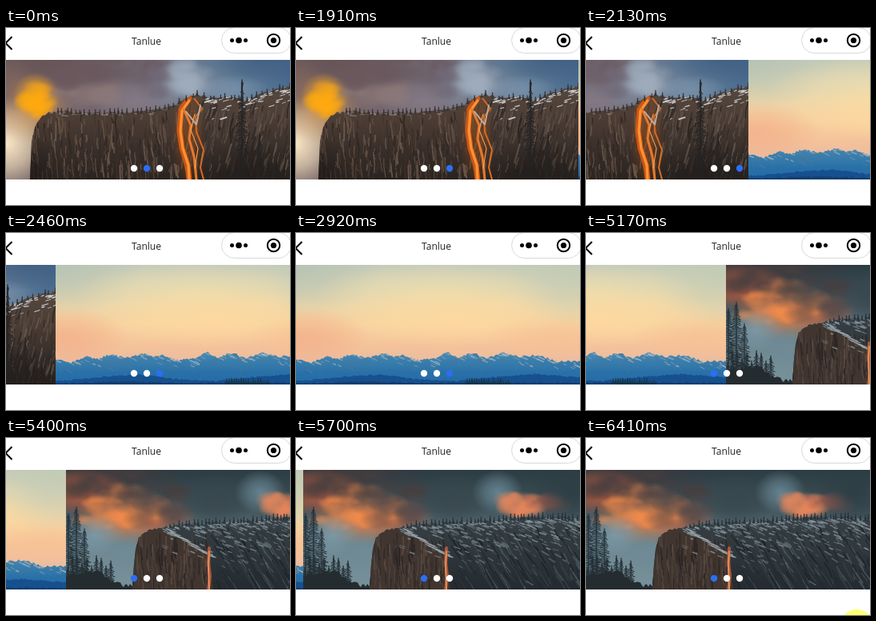
Animation of 355 by 222 pixels, one loop 6.48 s. Source, as an HTML page with a canvas:

```html
<!DOCTYPE html>
<html lang="en">
<head>
<meta charset="utf-8">
<title>Carousel</title>
<style>
html, body { margin: 0; width: 100%; height: 100%; overflow: hidden; background: #fff; }
canvas { position: absolute; left: 0; top: 0; display: block; }
h1 {
  position: absolute; left: 0; top: 7px; width: 351px; margin: 0; text-align: center;
  font: 400 12px/20px "Open Sans", "Noto Sans", sans-serif; color: #222;
}
</style>
</head>
<body>
<canvas id="stage" width="355" height="222"></canvas>
<h1>Tanlue</h1>
<script>
const W = 355, H = 222, TOP = 40, PH = 150, LOOP = 6480;
const ctx = document.getElementById('stage').getContext('2d');

function makeRandom(seed) {
  return () => {
    seed = (seed * 1664525 + 1013904223) >>> 0;
    return seed / 4294967296;
  };
}

function picture(seed, paint) {
  const c = document.createElement('canvas');
  c.width = W;
  c.height = PH;
  paint(c.getContext('2d'), makeRandom(seed));
  return c;
}

function fade(g, stops, x1 = 0, y1 = PH) {
  const f = g.createLinearGradient(0, 0, x1, y1);
  stops.forEach((s, i) => f.addColorStop(i / (stops.length - 1), s));
  return f;
}

function fillAll(g, style) {
  g.fillStyle = style;
  g.fillRect(0, 0, W, PH);
}

// Soft elliptical patch, rgb given as "r,g,b"
function glow(g, x, y, rx, ry, rgb, a = 1) {
  g.save();
  g.translate(x, y);
  g.scale(rx, ry);
  const f = g.createRadialGradient(0, 0, 0, 0, 0, 1);
  f.addColorStop(0, `rgba(${rgb},${a})`);
  f.addColorStop(0.5, `rgba(${rgb},${a * 0.6})`);
  f.addColorStop(1, `rgba(${rgb},0)`);
  g.fillStyle = f;
  g.fillRect(-1, -1, 2, 2);
  g.restore();
}

// Ragged cloud: many small glows inside an ellipse
function puffs(g, rnd, n, x, y, rx, ry, rgb, a, size) {
  for (let i = 0; i < n; i++) {
    const t = rnd() * 6.283, d = Math.sqrt(rnd());
    const s = size * (0.5 + rnd());
    glow(g, x + Math.cos(t) * d * rx, y + Math.sin(t) * d * ry, s * 1.5, s, rgb, a);
  }
}

// Height of a polyline [x, y, x, y, ...] at x
function heightAt(p, x) {
  let i = 0;
  while (i < p.length - 4 && x > p[i + 2]) i += 2;
  const k = (x - p[i]) / (p[i + 2] - p[i]);
  return p[i + 1] + (p[i + 3] - p[i + 1]) * k;
}

function ridge(g, rnd, p, rough) {
  const end = p[p.length - 2];
  g.beginPath();
  g.moveTo(p[0], PH);
  for (let x = p[0]; x <= end; x += 2) g.lineTo(x, heightAt(p, x) + (rnd() - 0.5) * rough);
  g.lineTo(end, heightAt(p, end));
  g.lineTo(end, PH);
  g.closePath();
}

function stroke(g, pts, color, width) {
  g.strokeStyle = color;
  g.lineWidth = width;
  g.lineCap = g.lineJoin = 'round';
  g.beginPath();
  for (let i = 0; i < pts.length; i += 2) g.lineTo(pts[i], pts[i + 1]);
  g.stroke();
}

function streaks(g, rnd, n, x0, x1, y0, y1, colors, lean) {
  for (let i = 0; i < n; i++) {
    const x = x0 + rnd() * (x1 - x0), y = y0 + rnd() * (y1 - y0), l = 5 + rnd() * 20;
    const c = colors[Math.floor(rnd() * colors.length)];
    stroke(g, [x, y, x + lean * l + rnd() * 2 - 1, y + l / 2, x + lean * 2 * l + rnd() * 4 - 2, y + l],
      c, 0.5 + rnd() * 1.5);
  }
}

// Short flecks below a ridge line
function flecks(g, rnd, n, p, x0, x1, depth, color, slope) {
  for (let i = 0; i < n; i++) {
    const x = x0 + rnd() * (x1 - x0), y = heightAt(p, x) + rnd() * rnd() * depth;
    const l = 2 + rnd() * 6;
    stroke(g, [x, y, x + l, y + l * slope + rnd() - 0.5], color, 0.5 + rnd() * 1.4);
  }
}

function tree(g, rnd, x, y, base, half, color) {
  stroke(g, [x, y, x, base], color, 1.3);
  for (let v = y + 3; v < base; v += 2.2) {
    const k = Math.min(1, (v - y) / (base - y) * 1.5 + 0.15);
    const a = half * k * (0.3 + rnd() * 0.7), b = half * k * (0.3 + rnd() * 0.7);
    stroke(g, [x - a, v + 1.5, x, v, x + b, v + 1.5], color, 1.1);
  }
}

const ember = picture(11, (g, rnd) => {
  fillAll(g, fade(g, ['#2c3c43', '#41535a', '#6e8791', '#78929c']));
  glow(g, 50, 0, 110, 32, '63,57,60', 0.9);
  glow(g, 15, 28, 70, 30, '190,91,60', 0.95);
  glow(g, 75, 58, 65, 38, '238,132,72', 0.95);
  glow(g, 120, 60, 45, 26, '180,94,67', 0.7);
  puffs(g, rnd, 34, 65, 48, 65, 24, '245,140,75', 0.5, 9);
  puffs(g, rnd, 24, 75, 20, 85, 15, '70,62,63', 0.55, 11);
  puffs(g, rnd, 16, 110, 45, 45, 22, '77,70,71', 0.5, 10);
  glow(g, 36, 82, 38, 26, '126,157,171', 0.85);
  glow(g, 75, 100, 26, 25, '112,140,152', 0.75);
  glow(g, 188, 38, 48, 35, '57,71,78', 0.85);
  glow(g, 243, 28, 32, 28, '111,144,158', 0.8);
  puffs(g, rnd, 20, 272, 43, 22, 13, '230,134,91', 0.6, 9);
  puffs(g, rnd, 12, 298, 42, 25, 8, '164,93,79', 0.5, 8);
  glow(g, 335, 28, 55, 45, '44,61,68', 0.85);

  const top = [83, 148, 86, 103, 91, 84, 104, 76, 125, 71, 150, 68, 190, 65, 230, 64, 252, 61, 300, 59, 355, 61];
  ridge(g, rnd, top, 2.5);
  g.save();
  g.clip();
  fillAll(g, fade(g, ['#394247', '#394247', '#30383d', '#242a2f']));
  g.fillStyle = '#40352f';
  g.beginPath();
  g.moveTo(80, PH);
  for (const [x, y] of [[84, 75], [115, 72], [137, 82], [163, 94], [178, 106], [184, PH]]) g.lineTo(x, y);
  g.fill();
  streaks(g, rnd, 150, 83, 180, 78, 140, ['#332b29', '#4c3f38', '#2a2525', '#574840'], 0.02);
  streaks(g, rnd, 190, 180, 355, 70, 140, ['#232b30', '#303a40', '#455158', '#1e2529'], 0.3);
  flecks(g, rnd, 240, top, 120, 355, 45, 'rgba(139,154,162,.7)', 0.35);
  flecks(g, rnd, 110, top, 185, 340, 85, 'rgba(122,138,147,.55)', 0.6);
  for (let i = 0; i < 45; i++) {
    const x = 125 + i * 1.3, y = 73 + i * 0.76 + rnd() * 4;
    stroke(g, [x, y, x + 5, y + 2], 'rgba(157,168,174,.75)', 1.3);
  }
  stroke(g, [179, 98, 178, 116, 180, 133, 178, PH], '#a95838', 4);
  stroke(g, [179, 102, 178, 119, 179, PH], '#ef9660', 1.6);
  g.restore();
  for (let x = 130; x < 355; x += 3 + rnd() * 4) {
    const y = heightAt(top, x);
    tree(g, rnd, x, y - 2 - rnd() * 4, y + 2, 1.5, '#29343a');
  }
  tree(g, rnd, 13, 47, PH, 12, '#253138');
  tree(g, rnd, 3, 55, PH, 12, '#263239');
  tree(g, rnd, 23, 74, PH, 9, '#29353b');
  for (let i = 0; i < 10; i++) tree(g, rnd, i * 6 + 2, 103 + rnd() * 20, PH, 7, '#263036');
  g.fillStyle = '#252c30';
  ridge(g, rnd, [0, 132, 25, 127, 43, 129, 63, 143, 83, 146], 6);
  g.fill();
});

const firefall = picture(23, (g, rnd) => {
  fillAll(g, fade(g, ['#716063', '#726268', '#75717d', '#6c8299', '#486b8f'], W, 0));
  glow(g, 55, 5, 110, 30, '100,81,82', 0.8);
  glow(g, 0, 105, 60, 60, '252,232,197', 1);
  glow(g, 35, 62, 50, 45, '215,158,92', 0.7);
  glow(g, 7, 32, 35, 34, '135,104,91', 0.7);
  glow(g, 38, 47, 30, 32, '244,162,22', 0.9);
  puffs(g, rnd, 25, 39, 50, 16, 24, '255,169,14', 0.55, 8);
  puffs(g, rnd, 15, 98, 43, 38, 15, '138,118,117', 0.5, 12);
  puffs(g, rnd, 25, 120, 16, 75, 22, '105,87,93', 0.5, 14);
  glow(g, 160, 52, 55, 25, '137,125,135', 0.7);
  puffs(g, rnd, 24, 224, 27, 28, 23, '158,172,188', 0.45, 13);
  puffs(g, rnd, 10, 188, 27, 10, 26, '112,105,120', 0.5, 11);
  glow(g, 318, 0, 90, 32, '61,91,126', 0.75);
  glow(g, 284, 38, 45, 20, '128,154,178', 0.6);

  const top = [30, 148, 31, 106, 36, 85, 43, 72, 53, 66, 75, 64, 100, 67, 130, 66, 160, 65, 188, 62,
    208, 58, 221, 50, 239, 43, 254, 48, 276, 46, 300, 50, 320, 42, 340, 36, 355, 33];
  ridge(g, rnd, top, 2.5);
  g.save();
  g.clip();
  fillAll(g, fade(g, ['#55473e', '#55473e', '#4b3c34', '#392f2a', '#29231f']));
  streaks(g, rnd, 330, 32, 225, 65, 140, ['#3a2e29', '#604e42', '#302722', '#685548', '#4c3c33'], 0.03);
  streaks(g, rnd, 230, 225, 355, 50, 140, ['#342d2a', '#554941', '#2a2523', '#65564b'], -0.12);
  glow(g, 34, 140, 35, 45, '32,26,24', 0.6);
  glow(g, 305, 142, 65, 40, '31,27,25', 0.65);
  flecks(g, rnd, 65, top, 248, 355, 29, 'rgba(216,221,226,.85)', -0.3);
  flecks(g, rnd, 42, top, 45, 215, 6, 'rgba(177,163,153,.5)', 0.05);
  glow(g, 228, 97, 22, 65, '169,82,25', 0.5);
  stroke(g, [229, 48, 219, 62, 217, 89, 220, 111, 227, 132, 229, PH], '#ce5715', 7);
  stroke(g, [229, 51, 220, 64, 218, 89, 221, 111, 228, 132, 229, PH], '#ff9230', 3.2);
  stroke(g, [222, 62, 231, 82, 229, 99, 235, 121, 238, PH], '#e6792a', 3);
  stroke(g, [235, 48, 245, 61, 237, 71, 238, 90, 247, 113, 243, 135, 247, PH], '#d96b23', 2);
  stroke(g, [236, 68, 231, 88, 240, 111, 236, 136], '#ffac58', 1);
  stroke(g, [225, 65, 238, 81, 243, 57], '#b5a9a1', 2);
  g.restore();
  for (let x = 65; x < 355; x += 4 + rnd() * 5) {
    const y = heightAt(top, x);
    tree(g, rnd, x, y - 2 - rnd() * 3, y + 2, 1.7, '#373434');
  }
  tree(g, rnd, 295, 25, PH, 8, '#242323');
  tree(g, rnd, 317, 91, PH, 6, '#282524');
  for (let i = 0; i < 9; i++) tree(g, rnd, 268 + i * 10, 122 + rnd() * 16, PH, 6, '#25211f');
  tree(g, rnd, 38, 130, PH, 6, '#211e1c');
});

const dusk = picture(37, (g, rnd) => {
  fillAll(g, fade(g, ['#c5ccb9', '#d7d2b4', '#ebd6aa', '#f7d3a1', '#f5c39a', '#e9bba0', '#d5b4a5']));
  glow(g, 0, 0, 110, 65, '177,192,178', 0.7);
  glow(g, 345, 8, 85, 70, '191,202,181', 0.65);
  glow(g, 175, 34, 155, 35, '238,222,174', 0.75);
  glow(g, 195, 64, 150, 39, '255,218,158', 0.8);
  glow(g, 12, 90, 80, 38, '242,173,137', 0.75);
  glow(g, 325, 91, 90, 28, '246,190,146', 0.6);

  const far = [0, 119, 19, 123, 38, 115, 52, 118, 70, 112, 86, 117, 110, 111, 122, 116, 135, 113, 153, 120,
    174, 117, 190, 110, 202, 116, 222, 110, 237, 117, 262, 110, 278, 116, 301, 113, 325, 121, 355, 121];
  ridge(g, rnd, far, 3);
  g.save();
  g.clip();
  fillAll(g, fade(g, ['#83a5b8', '#83a5b8', '#83a5b8', '#7da2b8', '#397fae', '#1b62a0']));
  flecks(g, rnd, 180, far, 0, W, 22, 'rgba(69,121,157,.65)', 0.65);
  flecks(g, rnd, 75, far, 0, W, 14, 'rgba(177,187,188,.65)', 0.45);
  g.restore();
  g.fillStyle = fade(g, ['#397dad', '#397dad', '#397dad', '#236ba6']);
  ridge(g, rnd, [0, 134, 60, 137, 120, 132, 190, 136, 255, 132, 310, 135, 355, 131], 3);
  g.fill();
  g.fillStyle = '#17508e';
  ridge(g, rnd, [0, 146, 35, 143, 70, 139, 110, 138, 145, 143, 200, 146, 255, 140, 300, 137, 355, 141], 2);
  g.fill();
  g.fillStyle = '#123f70';
  ridge(g, rnd, [0, 149, 80, 146, 165, 148, 260, 147, 355, 148], 2);
  g.fill();
  for (let x = 214; x < 267; x += 3) tree(g, rnd, x, 142 + rnd() * 4, PH, 3, '#17374c');
});

const moves = [
  { at: 1910, start: 1908, steps: [0, 70, 150, 220, 320, 390, 470, 540, 620, 700, 780, 850, 930, 1010] },
  { at: 4940, start: 4898, steps: [0, 70, 150, 230, 310, 380, 460, 530, 600, 680, 760, 840, 930] }
];
const slides = [firefall, dusk, ember];

// Carousel position in slides, updated only at the listed steps
function position(t) {
  return moves.reduce((sum, m) => {
    if (t < m.at) return sum;
    const now = m.at + m.steps.filter(s => s <= t - m.at).pop();
    const k = Math.min(1, (now - m.start) / 990);
    return sum + 1 - Math.pow(1 - k, 2.2);
  }, 0);
}

function disc(x, y, r, color) {
  ctx.fillStyle = color;
  ctx.beginPath();
  ctx.arc(x, y, r, 0, 7);
  ctx.fill();
}

function header() {
  ctx.lineCap = 'butt';
  ctx.lineJoin = 'miter';
  ctx.strokeStyle = '#000';
  ctx.lineWidth = 2;
  ctx.beginPath();
  ctx.moveTo(7.5, 11);
  ctx.lineTo(-0.5, 19);
  ctx.lineTo(7.5, 27);
  ctx.stroke();

  ctx.strokeStyle = '#d9d9d9';
  ctx.lineWidth = 1;
  ctx.beginPath();
  ctx.roundRect(269.5, -0.5, 87, 32, 16);
  ctx.stroke();
  disc(282.5, 15.5, 2.5, '#000');
  disc(291, 15.5, 3.8, '#000');
  disc(299.5, 15.5, 2.5, '#000');
  ctx.strokeStyle = '#000';
  ctx.lineWidth = 2;
  ctx.beginPath();
  ctx.arc(334.5, 15.5, 7.7, 0, 7);
  ctx.stroke();
  disc(334.5, 15.5, 3.6, '#000');
}

function draw(t) {
  ctx.fillStyle = '#fff';
  ctx.fillRect(0, 0, W, H);
  const x = Math.round(position(t) * W);
  slides.forEach((s, i) => ctx.drawImage(s, i * W - x, TOP));
  const active = t < 1910 ? 1 : t < 4940 ? 2 : 0;
  for (let i = 0; i < 3; i++) disc(160 + i * 16, 176, 4.2, i === active ? '#2b6ff3' : '#fff');
  header();
  if (t >= 6410) disc(338.5, 237, 22, '#ffff70');
}

const began = performance.now();
function tick() {
  draw((performance.now() - began) % LOOP);
  requestAnimationFrame(tick);
}
tick();
</script>
</body>
</html>
```
